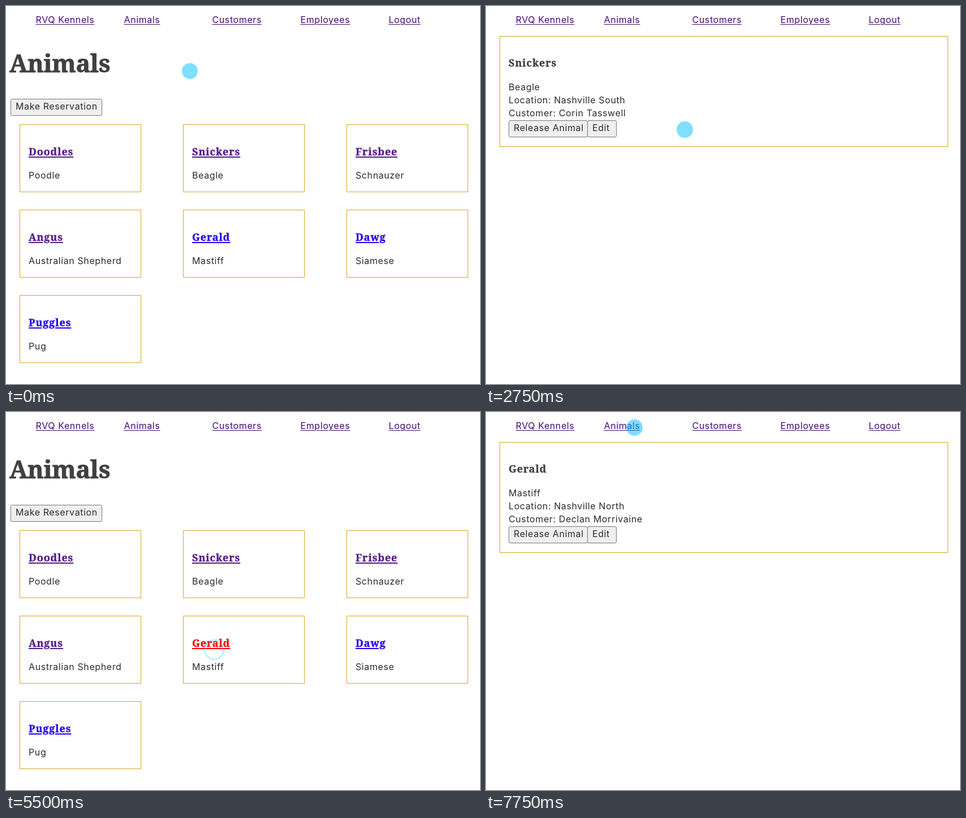
An HTML page for the animation above (8 s loop, 838 by 668 pixels).

```html
<!DOCTYPE html>
<html lang="en">
<head>
<meta charset="utf-8">
<title>Kennels</title>
<style>
  html, body { margin: 0; width: 100%; height: 100%; overflow: hidden; background: #fff; }
  #stage { position: relative; width: 838px; height: 668px; overflow: hidden; }
  #stage div, #stage span { position: absolute; box-sizing: border-box; }
  /* zero line height plus this margin puts the baseline at top */
  span { font: 16px/0 Inter, sans-serif; letter-spacing: .6px; margin-top: -.364em;
         white-space: pre; color: #2b2b2b; }
  .h1, .h3 { font: bold 18px/0 "Noto Serif", serif; letter-spacing: .9px; margin-top: -.388em;
             color: #404040; -webkit-text-stroke: .02em; }
  .h1 { font-size: 43px; letter-spacing: -.3px; }
  .link { text-decoration: underline; text-underline-offset: 2px; text-decoration-thickness: 1px; color: #46086f; }
  .h3.link { text-decoration-thickness: 2px; color: #551a8b; }
  .h3.new { color: #20e; }
  #stage .hot { color: #f00; }
  .card { border: 1px solid #daa520; }
  .button { border: 1px solid #767676; border-radius: 3px; background: #efefef; }
  #dot { width: 28.5px; height: 28.5px; margin: -14.25px; border-radius: 50%; background: rgba(0, 192, 255, .5); }
  #ring { border-radius: 50%; border: 3px solid #00c0ff; transform: translate(-50%, -50%); }
</style>
</head>
<body>
<div id="stage"></div>
<script>
const text = (x, y, s, cls = '', id = '') =>
  `<span id="${id}" class="${cls}" style="left:${x}px;top:${y}px">${s}</span>`;
const box = (x, y, w, h, cls) =>
  `<div class="${cls}" style="left:${x}px;top:${y}px;width:${w}px;height:${h}px"></div>`;
const button = (x, y, w, h, s) => box(x, y, w, h, 'button') + text(x + 9, y + 19, s);
const page = (id, html) => `<div id="${id}">${html}</div>`;

const nav = ['RVQ Kennels', 'Animals', 'Customers', 'Employees', 'Logout']
  .map((s, i) => text(52.5 + 156 * i, 30, s, 'link', 'nav' + s)).join('');

const pets = [
  ['Doodles', 'Poodle'], ['Snickers', 'Beagle'], ['Frisbee', 'Schnauzer'],
  ['Angus', 'Australian Shepherd'], ['Gerald', 'Mastiff'], ['Dawg', 'Siamese'],
  ['Puggles', 'Pug']
];
const cards = pets.map(([name, breed], i) => {
  const x = 24 + 289 * (i % 3), y = 209 + 151 * Math.floor(i / 3);
  return box(x, y, 215, 120, 'card') +
    text(x + 16, y + 55, name, 'h3 link' + (i > 3 ? ' new' : ''), 'pet' + name) +
    text(x + 16, y + 96, breed);
}).join('');

const detail = (name, breed, place, owner) =>
  box(24, 53, 793, 196, 'card') + text(40, 107, name, 'h3') + text(40, 149, breed) +
  text(40, 172, 'Location: ' + place) + text(40, 195, 'Customer: ' + owner) +
  button(40, 202, 140, 30, 'Release Animal') + button(179, 202, 52, 30, 'Edit');

const $ = id => document.getElementById(id);
$('stage').innerHTML = nav +
  page('list', text(6, 118, 'Animals', 'h1') + button(8, 164, 162, 30, 'Make Reservation') + cards) +
  page('first', detail('Snickers', 'Beagle', 'Nashville South', 'Corin Tasswell')) +
  page('second', detail('Gerald', 'Mastiff', 'Nashville North', 'Declan Morrivaine')) +
  '<div id="dot"></div><div id="ring"></div>';

// pointer path: time, x, y
const path = [
  [0, 325, 115], [1000, 367, 255], [2500, 367, 255], [2750, 351.5, 218.5], [3750, 268, 28],
  [4000, 253.5, 24], [4250, 253.5, 24], [4750, 220.5, 170.5], [5500, 367.5, 406],
  [6750, 367.5, 406], [7750, 262.5, 27.5], [8000, 255, 24]
];
// each click opens a page one step later
const STEP = 250;
const clicks = [
  { at: 1250, hot: 'petSnickers', opens: 'first' },
  { at: 4000, hot: 'navAnimals', opens: 'list' },
  { at: 5500, hot: 'petGerald', opens: 'second' }
];
const ringSizes = [37, 39, 41], ringAlphas = [.25, .17, .07];

function pointAt(t) {
  const i = path.findIndex(k => k[0] > t);
  const [t0, x0, y0] = path[i - 1], [t1, x1, y1] = path[i];
  const u = (t - t0) / (t1 - t0);
  return [x0 + (x1 - x0) * u, y0 + (y1 - y0) * u];
}

function place(el, x, y) {
  el.style.left = x + 'px';
  el.style.top = y + 'px';
}

function draw(t) {
  let shown = 'list', ringClick = null;
  for (const c of clicks) {
    const age = t - c.at;
    if (age >= STEP) shown = c.opens;
    if (age >= 0 && age < 3 * STEP) ringClick = c;
    $(c.hot).classList.toggle('hot', age >= 0 && age < STEP);
  }
  for (const id of ['list', 'first', 'second']) $(id).style.display = id === shown ? '' : 'none';

  const dot = $('dot'), ring = $('ring');
  dot.style.display = ringClick ? 'none' : '';
  ring.style.display = ringClick ? '' : 'none';
  place(dot, ...pointAt(t));
  if (ringClick) {
    const n = (t - ringClick.at) / STEP, [x, y] = pointAt(ringClick.at);
    place(ring, x, y + 14);
    ring.style.width = ring.style.height = ringSizes[n] + 'px';
    ring.style.opacity = ringAlphas[n];
  }
}

const start = performance.now();
function tick() {
  const t = (performance.now() - start) % 8000;
  draw(Math.floor(t / STEP) * STEP);
  requestAnimationFrame(tick);
}
tick();
</script>
</body>
</html>
```
